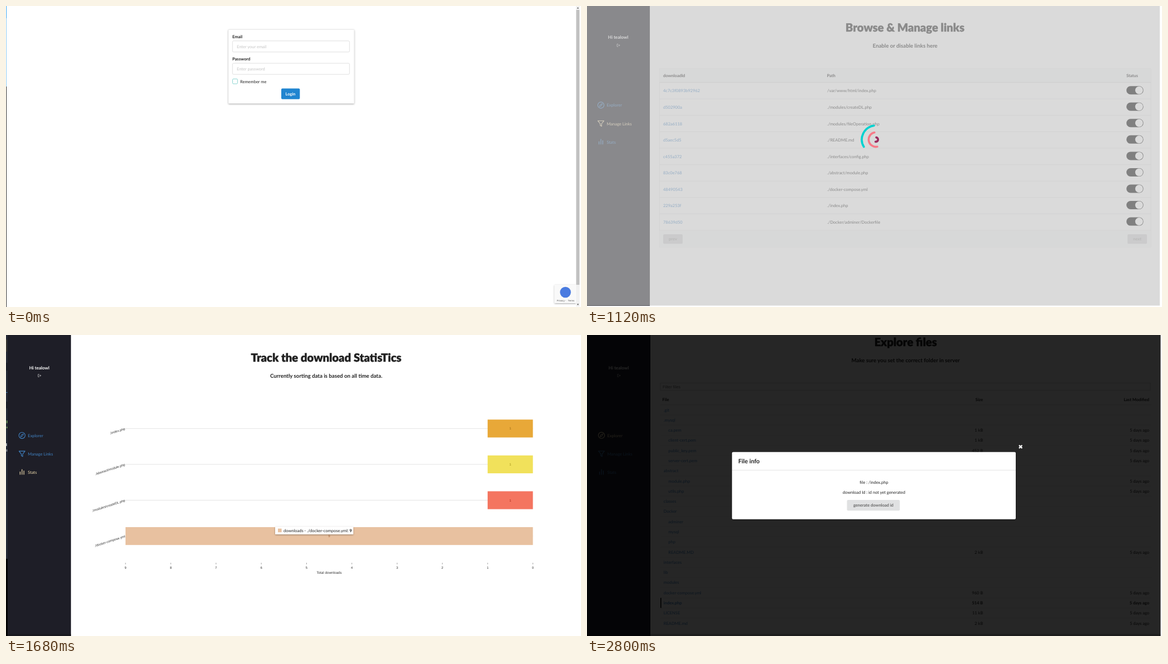
An HTML page that plays this animation: 1034x542 px, repeating every 3360 ms.

```html
<!DOCTYPE html>
<html lang="en">
<head>
<meta charset="utf-8">
<title>File sharing tour</title>
<style>
  html, body { margin: 0; width: 100%; height: 100%; overflow: hidden; background: #fff; }
  svg { display: block; }
  #stage { width: 1034px; height: 542px; }
  text { font-family: Lato, sans-serif; text-rendering: geometricPrecision; white-space: pre; }
  .arial { font-family: "Liberation Sans", Arial, sans-serif; }
  .roboto { font-family: Roboto, sans-serif; }
  .scene { visibility: hidden; }
  .scene.on { visibility: visible; }
</style>
</head>
<body>
<svg id="stage" viewBox="0 0 1034 542">
  <defs>
    <filter id="soft" x="-20%" y="-20%" width="140%" height="150%">
      <feDropShadow dx="0" dy="1" stdDeviation="1.4" flood-opacity=".35"/>
    </filter>
    <clipPath id="tile"><rect width="67.6" height="67.6"/></clipPath>
  </defs>
</svg>
<script>
const STEP = 560;
const INK = '#212121', LINK = '#4183c4', ACTIVE = '#f3dfb0', SIDE = '#1e1e27';

const rect = (x, y, w, h, fill, more = '') =>
  `<rect x="${x}" y="${y}" width="${w}" height="${h}" fill="${fill}" ${more}/>`;
const path = (d, fill, more = '') => `<path d="${d}" fill="${fill}" ${more}/>`;
const line = (d, color, width = 1, more = '') =>
  path(d, 'none', `stroke="${color}" stroke-width="${width}" ${more}`);
const circle = (x, y, r, fill, more = '') =>
  `<circle cx="${x}" cy="${y}" r="${r}" fill="${fill}" ${more}/>`;
const group = (x, y, body, more = '') => `<g transform="translate(${x} ${y})" ${more}>${body}</g>`;

// y is the middle of the capitals
function text(x, y, s, { size = 7.5, fill = INK, weight = 400, anchor = 'start', font = '', more = '' } = {}) {
  return `<text x="${x}" y="${y + size * .35}" font-size="${size}" font-weight="${weight}"
    fill="${fill}" text-anchor="${anchor}" class="${font}" ${more}>${s.replace(/&/g, '&amp;')}</text>`;
}
const bold = (x, y, s, o = {}) => text(x, y, s, { weight: 700, ...o });
const mid = (x, y, s, o = {}) => text(x, y, s, { anchor: 'middle', ...o });
const end = (x, y, s, o = {}) => text(x, y, s, { anchor: 'end', ...o });

const title = (x, y, s) => mid(x, y, s, { size: 20.3, weight: 900, more: `stroke="${INK}" stroke-width=".45"` });
const subtitle = (x, y, s) => mid(x, y, s, { size: 9.7, weight: 700 });

function scrollbar(x, top, bottom) {
  return rect(x, 0, 6.6, 541, '#f1f1f1') + rect(x + .4, top, 5.8, bottom - top, '#c1c1c1') +
    path(`M${x + 1.6} 4.4h3.6l-1.8-2.2z`, '#505050') + path(`M${x + 1.6} 536.6h3.6l-1.8 2.2z`, '#505050');
}

function badge(x, y, alpha) {
  return group(x, y,
    rect(0, 0, 39, 33, '#f9f9f9', 'filter="url(#soft)"') + rect(0, 0, 39, 33, '#f9f9f9') +
    circle(19.5, 13.5, 9.8, '#4a7be0') +
    text(4, 28, 'Privacy -', { size: 4.3, fill: '#555', font: 'arial' }) +
    text(24, 28, 'Terms', { size: 4.3, fill: '#555', font: 'arial' }), `opacity="${alpha}"`);
}

function sidebar(dx, dy, active, bottom) {
  const color = i => i === active ? ACTIVE : LINK;
  const icons = [
    c => circle(26, 179.7, 5.6, 'none', `stroke="${c}" stroke-width="1.1"`) +
      line('M28.6 177l-1.5 3.8-3.7 1.6 1.5-3.8z', c, 1),
    c => line('M20.6 208h10.8l-4.2 5.2v4.6l-2.4-1.6v-3z', c, 1.1, 'stroke-linejoin="round"'),
    c => line('M22.6 250.5v-5.5M26 250.5v-9.8M29.4 250.5v-7.3', c, 1.2)
  ];
  const items = ['Explorer', 'Manage Links', 'Stats'].map((s, i) =>
    icons[i](color(i)) + text(36.5, 179.9 + i * 33.2, s, { fill: color(i) })).join('');
  const left = dx > 2 ? dx : 0;
  return rect(left, 0, 114 + dx - left, bottom, SIDE) + group(dx, dy,
    mid(57, 57.8, 'Hi tealowl', { size: 8, weight: 700, fill: '#fff' }) +
    line('M57 69.7h-2v4.6h2M56.8 72h3M58.5 70.5l1.5 1.5-1.5 1.5', '#ddd', .7) + items);
}

const KB1 = '1 kB', KB2 = '2 kB';
const FILES = [
  ['.git'], ['.mysql'], ['>ca.pem', KB1], ['>client-cert.pem', KB1], ['>public_key.pem', '452 B'],
  ['>server-cert.pem', KB1], ['abstract'], ['>module.php', '960 B'], ['>utils.php', KB2], ['classes'],
  ['Docker'], ['>adminer'], ['>mysql'], ['>php'], ['>README.MD', KB2], ['interfaces'], ['lib'],
  ['modules'], ['docker-compose.yml', '960 B'], ['index.php', '514 B'], ['LICENSE', '11 kB'], ['README.md', KB2]
];

function explorer({ dy, center, size, right, picked }) {
  let out = title(center, 12.2, 'Explore files') +
    subtitle(center, 44.2, 'Make sure you set the correct folder in server') +
    rect(132, 85.5, right - 130, 13.2, '#fff', 'stroke="#ccc" stroke-width=".8"') +
    text(136, 92, 'Filter files', { font: 'arial', fill: '#757575' }) +
    bold(135.5, 115.7, 'File') + bold(size, 115.7, 'Size', { anchor: 'end' }) +
    bold(right, 115.7, 'Last Modified', { anchor: 'end' }) +
    line(`M132 124.6H${right + 4}`, '#d9dadb', .8);
  FILES.forEach(([name, bytes], i) => {
    const y = 133.9 + i * 18.29, weight = name === picked ? 700 : 400;
    const nested = name[0] === '>';
    out += text(nested ? 146.3 : 137.8, y, name.replace('>', ''), { fill: LINK, weight });
    if (bytes) out += end(size, y, bytes, { weight }) + end(right, y, '5 days ago', { weight });
    if (i < FILES.length - 1) out += line(`M132 ${y + 9.1}H${right + 4}`, '#e4e4e5', .6);
    if (weight === 700) out += rect(132, y - 9, 1.6, 18, '#000');
  });
  return group(0, dy, out);
}

function login() {
  const field = (y, label, hint) => bold(407, y, label) +
    rect(407.3, y + 7.8, 210.4, 20, '#fff', 'rx="2" stroke="#d8d8d9" stroke-width=".8"') +
    text(415, y + 18.2, hint, { fill: '#c4c4c4' });
  return rect(0, 0, 1, 22, '#3fa9f5') + rect(0, 22, 1, 123, '#8fcdf8') + rect(0, 145, 1, 397, '#333') +
    rect(400, 42.5, 226, 133, '#fff', 'rx="1" filter="url(#soft)" stroke="#ddd" stroke-width=".5"') +
    field(55, 'Email', 'Enter your email') + field(95.3, 'Password', 'Enter password') +
    rect(407.5, 131.3, 8.8, 8.8, '#fff', 'rx="1.5" stroke="#6fc9c6" stroke-width=".8"') +
    text(421, 136, 'Remember me') +
    rect(495, 148.5, 33.4, 19.2, '#2185d0', 'rx="2"') +
    mid(511.5, 158.2, 'Login', { weight: 700, fill: '#fff' }) +
    badge(986.5, 502, 1) + rect(1024.6, 0, 7, 542, '#fff') + scrollbar(1025, 7, 502);
}

const explore = () => sidebar(0, 0, 0, 538.3) +
  explorer({ dy: 0, center: 569.5, size: 706.6, right: 1003 }) + scrollbar(1024, 33, 534);

const LINKS = [
  ['4c7c3f0893b92962', '/var/www/html/index.php'], ['d502900a', './modules/createDL.php'],
  ['682a6118', './modules/fileOperation.php'], ['d5aec5d5', './README.md'],
  ['c455a372', './interfaces/config.php'], ['83c0e768', './abstract/module.php'],
  ['48490543', './docker-compose.yml'], ['229a253f', './index.php'], ['78639d50', './Docker/adminer/Dockerfile']
];

function manage() {
  const button = (x, s) => rect(x, 411, 35, 17.3, '#d6d7d8', 'rx="2"') +
    mid(x + 17.5, 419.6, s, { weight: 700, fill: '#a5a5a5' });
  const rows = LINKS.map(([id, file], i) => {
    const y = 152.8 + i * 29.55;
    return text(137, y, id, { fill: LINK }) + text(432, y, file) +
      line(`M130.5 ${y + 14.6}H1014`, '#dcdcdd', .6) +
      rect(970, y - 8.6, 30.6, 15, '#050505', 'rx="7.5"') + circle(992.8, y - 1.1, 7, '#fff');
  }).join('');
  const arc = (r, from, to, color) => {
    const p = a => [519.5 + r * Math.cos(a * Math.PI / 180), 240.5 + r * Math.sin(a * Math.PI / 180)].join(' ');
    return line(`M${p(from)}A${r} ${r} 0 0 1 ${p(to)}`, color, 3.7, 'stroke-linecap="round"');
  };
  return sidebar(-1, -1.2, 1, 540) + title(571.8, 39, 'Browse & Manage links') +
    subtitle(572, 71.7, 'Enable or disable links here') +
    rect(130.5, 113, 883.5, 321, '#fff', 'stroke="#dcdcdd" stroke-width=".6"') +
    rect(130.5, 113, 883.5, 24.5, '#f9fafb') + rect(130.5, 404, 883.5, 30, '#f9fafb') +
    line('M130.5 137.6H1014', '#d2d2d3', .7) +
    bold(137, 125.5, 'downloadId') + bold(431.5, 125.5, 'Path') + bold(970, 125.5, 'Status') +
    rows + button(137, 'prev') + button(972, 'next') +
    rect(0, 0, 1030, 539.5, '#c5c5c5', 'opacity=".64"') +
    arc(25.3, 149, 262, '#00d2d0') + arc(13, 79, 258, '#f77a88') + arc(3.9, -80, 100, '#9b2c5f');
}

const BARS = [
  ['./index.php', 1, '#e8a838', '#936412'], ['./abstract/module.php', 1, '#f1e15b', '#978710'],
  ['./modules/createDL.php', 1, '#f47560', '#a02410'], ['./docker-compose.yml', 9, '#e8c1a0', '#a2673b']
];

function stats() {
  const unit = 81.4, zero = 947.5, small = { size: 5.9, font: 'arial', fill: '#333' };
  let out = rect(0, 0, 3, 403, '#272c38') + rect(0, 403, 3, 139, '#000') + rect(0, 8, 2, 22, '#3d3a33') +
    rect(0, 103, 3, 1, '#3e7fb8') + rect(0, 50, 3, 14, '#1c2029') + rect(0, 120, 3, 12, '#1c2029') +
    rect(1, 154, 1.5, 5, '#7fae62') + rect(1, 165, 1.5, 3, '#7fae62') +
    rect(0, 195, 1.5, 5, '#c9ccd2') + rect(1, 206, 1, 4, '#c9ccd2') +
    sidebar(2.8, 1.1, 2, 542) + rect(3, 538.5, 113.8, 3.5, '#19191f') +
    title(575.8, 41, 'Track the download StatisTics') +
    subtitle(575.8, 73.8, 'Currently sorting data is based on all time data.');
  BARS.forEach(([name, n, color, dark], i) => {
    const y = 168.4 + i * 64.55, x = zero - n * unit;
    out += line(`M215 ${y}H${zero}`, '#ddd', .8) + rect(x, y - 16.1, n * unit, 32.2, color) +
      mid((x + zero) / 2, y, String(n), { ...small, fill: dark }) +
      group(214, y, end(0, 0, name, small).replace('<text', '<text transform="rotate(-18)"'));
  });
  for (let n = 0; n <= 9; n++) {
    const x = zero - n * unit;
    out += line(`M${x} 410.2v2.7`, '#777', .7) + mid(x, 419.2, String(n), small);
  }
  return out + mid(581, 427.6, 'Total downloads', { ...small, size: 6.3 }) +
    rect(484, 345.3, 140.5, 13.6, '#fff', 'rx="1" filter="url(#soft)"') +
    rect(489, 348.6, 6.6, 6.6, '#e8c1a0') +
    text(499, 352, 'downloads - ./docker-compose.yml: <tspan font-weight="700">9</tspan>');
}

// Flat stand-ins for the street photographs
const TILES = [
  () => rect(0, 0, 68, 40, '#a9b9bc') + rect(0, 10, 13, 14, '#2f6da8') + path('M32 12h16v13h-16z', '#4e7a78') +
    rect(0, 25, 68, 14, '#5a6350') + path('M0 35l42-2 22 1-10 17H8z', '#f0f0ee') + path('M4 43l56-6-8 14H10z', '#2e5c93') +
    rect(0, 51, 68, 17, '#77703f') + path('M6 58q14-8 40 0v10H4z', '#4f5a28') +
    rect(50, 0, 3, 60, '#695d48') + rect(58, 0, 6, 68, '#594b3b'),
  () => rect(0, 0, 68, 40, '#3c4734') + rect(0, 38, 68, 30, '#6b6255') + path('M0 0h68v12H34z', '#59634b') +
    path('M12 34l30-15 12 8 14 1-8 22-38 4z', '#dfe0de') + line('M20 43l44-8', '#474b51', 2) +
    path('M0 26l22-2L10 58z', '#b6202c') + path('M5 31l11-1-6 16z', '#e6dede') + rect(0, 59, 68, 9, '#4a453c'),
  () => rect(0, 0, 68, 42, '#c6cdd1') + path('M0 29l14-3 10 4 14-3 30-9v24H0z', '#4d5a49') +
    path('M0 40h68v28H0z', '#808080') + path('M0 52l28-12 4 1L0 66z', '#a5a39a') +
    line('M34 41l-6 27M36 41l20 27', '#d0d0cc', .8) + line('M0 2l68 15M0 12l68 8M52 0v42', '#555d60', .8) +
    rect(55, 42, 8, 5, '#303335') + rect(42, 42, 5, 4, '#44494c'),
  () => rect(0, 0, 68, 68, '#404638') + rect(0, 0, 68, 20, '#272f24') + path('M0 34l68-8v20L0 50z', '#555c42') +
    path('M0 52l68-8v24H0z', '#898883') + path('M0 49l40 14-10 5H0z', '#696b59') +
    circle(31, 41, 5, 'none', 'stroke="#292c29" stroke-width="1.5"') +
    circle(46, 40, 5, 'none', 'stroke="#292c29" stroke-width="1.5"') + rect(17, 0, 4, 43, '#292b25'),
  () => rect(0, 0, 68, 68, '#908f8c') + rect(0, 0, 68, 20, '#444c3e') + rect(33, 9, 18, 8, '#c7cbcd') +
    rect(54, 5, 13, 9, '#34383d') + path('M2 18l22-8 15 9 5 11-20 9-20-5z', '#eeeeec') +
    path('M7 22l20-6 10 8-18 6z', '#686b70') + path('M0 39l24 2 18-11 4 6-22 11-24-2z', '#484746') +
    path('M0 47l24 8-13 13H0z', '#66635b'),
  () => rect(0, 0, 68, 68, '#56534e') + rect(0, 0, 68, 24, '#706b5e') + path('M26 0h42v27L35 17z', '#85705a') +
    rect(4, 10, 13, 8, '#474a4e') + path('M0 24l36-3 32 19v28H0z', '#4d4d4c') +
    path('M41 28l27 9v6L38 31z', '#b8b5ae') + line('M10 29l5 8M19 29l6 8', '#b8b5ae', 2),
  () => rect(0, 0, 68, 68, '#858887') + rect(0, 0, 68, 38, '#cbd1d3') + path('M0 2h16l7 12v29H0z', '#ad9a86') +
    rect(24, 10, 9, 28, '#77807f') + path('M68 0v53L41 42V16z', '#76594c') + rect(34, 22, 6, 7, '#376fa4') +
    path('M0 48l30-9 8 1 30 17v11H0z', '#747676') + rect(10, 43, 10, 6, '#3c4144') + line('M31 42L20 68', '#c2bc98', .8),
  () => rect(0, 0, 68, 68, '#93989a') + rect(0, 0, 68, 40, '#7b8994') + rect(0, 0, 22, 29, '#b1a38e') +
    rect(27, 0, 12, 37, '#668aaa') + rect(47, 2, 21, 39, '#66563f') + rect(0, 27, 13, 9, '#e5e7e7') +
    rect(37, 22, 4, 18, '#343a40') + rect(45, 24, 4, 17, '#443b36') + path('M18 40l50 18v10H0V46z', '#777e83') +
    line('M3 47l50 19M0 57l30 11', '#c9cccc', 2) + rect(61, 0, 2, 57, '#373a37'),
  () => rect(0, 0, 68, 39, '#b0c6d7') + path('M0 12q22-9 68 3v9H0z', '#c8d4dc') +
    path('M0 33l18-4 18 2 32-4v15H0z', '#5e6c58') + rect(0, 40, 68, 28, '#8c8d84') + rect(0, 43, 68, 6, '#717763') +
    path('M0 56l68-4v16H0z', '#848482') + line('M0 63l68-8', '#b9b8b1', 1.4) +
    rect(17, 0, 8, 5, '#30352f') + rect(47, 2, 4, 8, '#30352f') + rect(10, 20, 1.5, 35, '#555c55') + rect(34, 42, 11, 4, '#42484c')
];

function captcha() {
  const folder = (x, y, turn, fill) => group(x, y,
    `<g transform="rotate(${turn})">${path('M0 2q0-2 2-2h8l3 3h15q2 0 2 2v17q0 2-2 2H2q-2 0-2-2z', fill, 'stroke="#e9dfc6" stroke-width=".6"')}</g>`);
  const tiles = TILES.map((draw, i) =>
    group(407 + i % 3 * 69.8, 293.2 + Math.floor(i / 3) * 69.9, draw(), 'clip-path="url(#tile)"')).join('');
  const icon = '#555';
  return folder(500, 4, 7, '#f6efdd') + folder(495, 6, 3, '#f6eedb') + folder(491, 10.5, 0, '#f5ecd8') +
    mid(509.5, 88.3, 'index.php', { fill: '#8d8d8d' }) + mid(509.7, 98.4, '514 bytes', { fill: '#8d8d8d' }) +
    rect(424.5, 145, 171, 38, '#fff', 'rx="4.5" stroke="#84a6f2" stroke-width="1"') +
    mid(509.7, 164.4, 'Checking Captcha..', { size: 13.6, fill: '#9bb4f0' }) +
    rect(403, 224.7, 214.3, 311, '#fff', 'stroke="#c8c8c8" stroke-width=".9"') +
    rect(407, 228.8, 207.2, 61.2, '#4a90e2') +
    text(419.7, 246.5, 'Select all images with', { size: 8.4, fill: '#fff', font: 'roboto' }) +
    bold(419.7, 260.8, 'boats', { size: 14.8, fill: '#fff', font: 'roboto' }) +
    tiles + line('M403 504.4H617', '#d6d6d6', .8) +
    line('M423.4 518.6a5 5 0 1 0 .5 4.4', icon, 1.5) + path('M424.8 515.5v5h-5z', icon) +
    line('M439.6 523v-2.5a5.5 5.5 0 0 1 11 0v2.5', icon, 1.5) +
    rect(438.8, 521.3, 3.6, 5.7, icon, 'rx="1"') + rect(447.8, 521.3, 3.6, 5.7, icon, 'rx="1"') +
    circle(470.8, 521.3, 6.1, 'none', `stroke="${icon}" stroke-width="1.3"`) +
    line('M470.8 520.2v4.4M470.8 517.8v1.3', icon, 1.4) +
    rect(560, 510, 53.6, 22, '#4a90e2', 'rx="1"') +
    mid(586.7, 521.1, 'VERIFY', { weight: 700, fill: '#fff', font: 'roboto' }) +
    badge(983.8, 501.5, .6) + rect(1021.6, 0, 8, 542, '#fff') + scrollbar(1022, 26, 533);
}

function fileInfo() {
  return sidebar(0, 1, 0, 542) +
    explorer({ dy: 1, center: 573, size: 712, right: 1011, picked: 'index.php' }) +
    rect(0, 0, 1031.5, 542, '#000', 'opacity=".85"') + rect(0, 538.5, 1031.5, 3.5, '#000', 'opacity=".25"') +
    line('M777 198.5l5.4 5.4M782.4 198.5l-5.4 5.4', '#fff', 2.3) +
    rect(260.8, 210.8, 510.2, 121, '#fff', 'rx="2" filter="url(#soft)"') +
    bold(272, 227.2, 'File info', { size: 10.8 }) + line('M261 243.4H771', '#dcdcdd', .8) +
    mid(516, 265, 'file : /index.php') + mid(516, 283.6, 'download Id : id not yet generated') +
    rect(467.5, 297, 95, 19.2, '#e0e1e2', 'rx="2"') +
    mid(515, 306.6, 'generate download id', { weight: 700, fill: '#666' });
}

const stage = document.getElementById('stage');
stage.insertAdjacentHTML('beforeend', [login, explore, manage, stats, captcha, fileInfo]
  .map(draw => `<g class="scene">${draw()}</g>`).join(''));
const scenes = [...stage.querySelectorAll('.scene')];
const start = performance.now();

function show() {
  const now = Math.floor(Math.max(0, performance.now() - start) / STEP) % scenes.length;
  scenes.forEach((scene, i) => scene.classList.toggle('on', i === now));
  requestAnimationFrame(show);
}
show();
</script>
</body>
</html>
```
